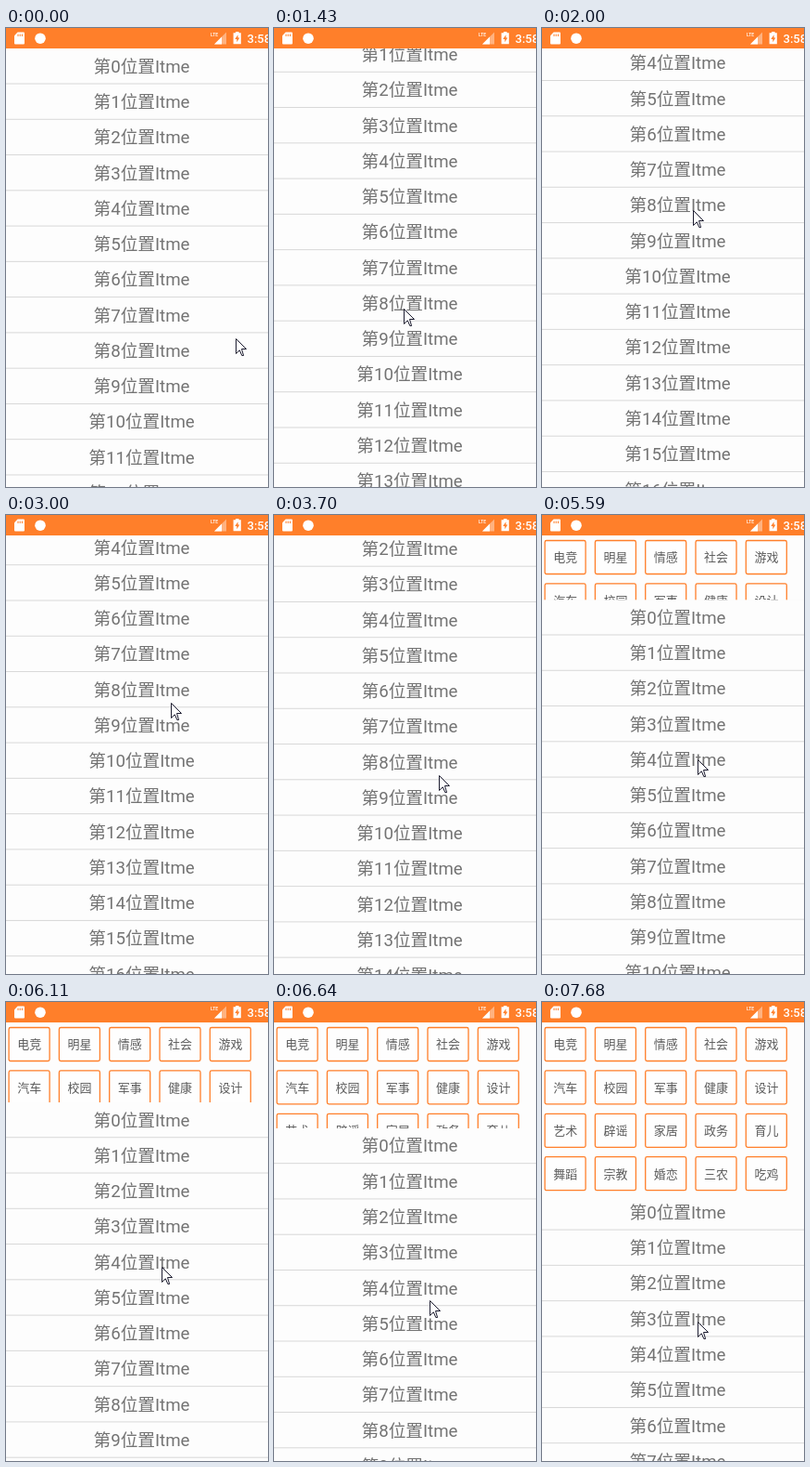
Recreate the animation shown at these times as an HTML page. Size 283 by 494 pixels, loop 8 s.

```html
<!DOCTYPE html>
<html lang="zh-CN">
<head>
<meta charset="utf-8">
<title>List with pull-down tags</title>
<style>
  html, body { margin: 0; width: 100%; height: 100%; overflow: hidden; background: #fdfdfd; }
  svg { display: block; width: 283px; height: 494px; }
  text { font-family: Roboto, "Noto Sans CJK SC", "Noto Sans CJK", sans-serif; }
  .row { font-size: 18.7px; fill: #737373; text-anchor: middle; }
  .tag { font-size: 13px; fill: #5c5c5c; text-anchor: middle; }
  .box { fill: #fefefe; stroke: #ff7f2a; stroke-width: 1.3; }
</style>
</head>
<body>
<svg viewBox="0 0 283 494">
  <rect width="283" height="494" fill="#fdfdfd"/>
  <g id="tags"></g>
  <g id="list"><rect y="-19" width="283" height="1000" fill="#fdfdfd"/></g>

  <g id="status" fill="#fff">
    <rect width="283" height="22" fill="#ff7f2a"/>
    <path d="M12.6 4.5H19a1 1 0 0 1 1 1V16.5a1 1 0 0 1-1 1H10a1 1 0 0 1-1-1V8.2Z"/>
    <path d="M13 6.500v2.500M15.200 6.500v2.500M17.400 6.500v2.500" stroke="#ff7f2a"/>
    <circle cx="37" cy="11.200" r="5.800"/>
    <text x="221" y="9" font-size="5" font-weight="500">LTE</text>
    <path d="M238 4.500V17.500H225Z" opacity=".4"/>
    <path d="M233 9.500V17.500H225Z"/>
    <path d="M248 4h3.500v1.300h2.300V17.300h-8.200V5.300H248Z"/>
    <path d="M250.500 7.200L247.300 12h2v3.300l3-4.800h-1.800Z" fill="#ff7f2a"/>
    <text x="260.500" y="16" font-size="13" font-weight="500">3:58</text>
  </g>

  <path id="cursor" d="M.5.5V16.500L4.300 12.800L6.800 18.500H8.600L6.500 11.500H11.500Z"
        fill="#fff" stroke="#1c1c30"/>
</svg>
<script>
const LOOP = 8000, STEP = 134;
const PITCH = 38.27, CENTER = 146.5;
const HOME = 41.3, OPEN = HOME + 185.1;
const byId = id => document.getElementById(id);
const list = byId("list"), tags = byId("tags"), cursor = byId("cursor");

function add(parent, name, attrs, text = "") {
  const el = document.createElementNS("http://www.w3.org/2000/svg", name);
  for (const key in attrs) el.setAttribute(key, attrs[key]);
  el.textContent = text;
  parent.append(el);
}

for (let i = 0; i < 22; i++) {
  const y = i * PITCH;
  add(list, "text", { class: "row", x: CENTER, y: y + 6.5 }, `第${i}位置Itme`);
  add(list, "rect", { x: 0, y: y + 18.2, width: 283, height: 1, fill: "#d8d8d8" });
}

const labels = "电竞 明星 情感 社会 游戏 汽车 校园 军事 健康 设计 " +
  "艺术 辟谣 家居 政务 育儿 舞蹈 宗教 婚恋 三农 吃鸡";
labels.split(" ").forEach((label, i) => {
  const x = 3.1 + (i % 5) * 54.3, y = 27.5 + Math.floor(i / 5) * 46.4;
  add(tags, "rect", { class: "box", x, y, width: 44, height: 36, rx: 1.8 });
  add(tags, "text", { class: "tag", x: x + 22.1, y: y + 22.9 }, label);
});

const linear = p => p;
const easeIn = p => p * p;
const easeOut = p => 1 - (1 - p) ** 2;

// Each move takes the pointer to (x, y) by `end`; the list follows it by the
// factor `pull`, or glides by itself to the offset `settle`.
const moves = [
  { end: 1050, x: 147, y: 353, sway: -20 },
  { end: 1430, x: 140, y: 302, pull: 1 },
  { end: 2150, x: 178, y: 126, pull: 1 },
  { end: 2450, x: 178, y: 126 },
  { end: 3000, x: 178, y: 202, pull: 0.89 },
  { end: 3570, x: 178, y: 280, pull: 1 },
  { end: 4380, x: 168, y: 188, settle: HOME, ease: easeOut },
  { end: 4520, x: 168, y: 188 },
  { end: 4660, x: 168, y: 200, pull: 0.92 },
  { end: 5590, x: 168, y: 263, pull: 0.92 },
  { end: 6640, x: 168, y: 321, pull: 0.77 },
  { end: 7680, x: 168, y: 344, settle: OPEN, ease: easeIn },
  { end: LOOP, x: 168, y: 344 }
];

let last = { end: 0, x: 248, y: 334, top: HOME };
for (const move of moves) {
  const { pull = 0, settle = last.top + pull * (move.y - last.y) } = move;
  move.top = settle;
  move.from = last;
  last = move;
}

// The picture refreshes in even steps of about STEP within each move.
function poseAt(t) {
  const move = moves.find(m => t < m.end);
  const { from, sway = 0, ease = linear } = move;
  const span = move.end - from.end;
  const steps = Math.round(span / STEP);
  const p = Math.floor((t - from.end) / span * steps) / steps;
  const mix = (key, q) => from[key] + (move[key] - from[key]) * q;
  return {
    x: mix("x", p),
    y: mix("y", p) + sway * Math.sin(2 * Math.PI * p),
    top: mix("top", ease(p))
  };
}

function draw() {
  const { x, y, top } = poseAt(performance.now() % LOOP);
  list.setAttribute("transform", `translate(0 ${top})`);
  cursor.setAttribute("transform", `translate(${Math.round(x)} ${Math.round(y)})`);
  requestAnimationFrame(draw);
}
draw();
</script>
</body>
</html>
```
